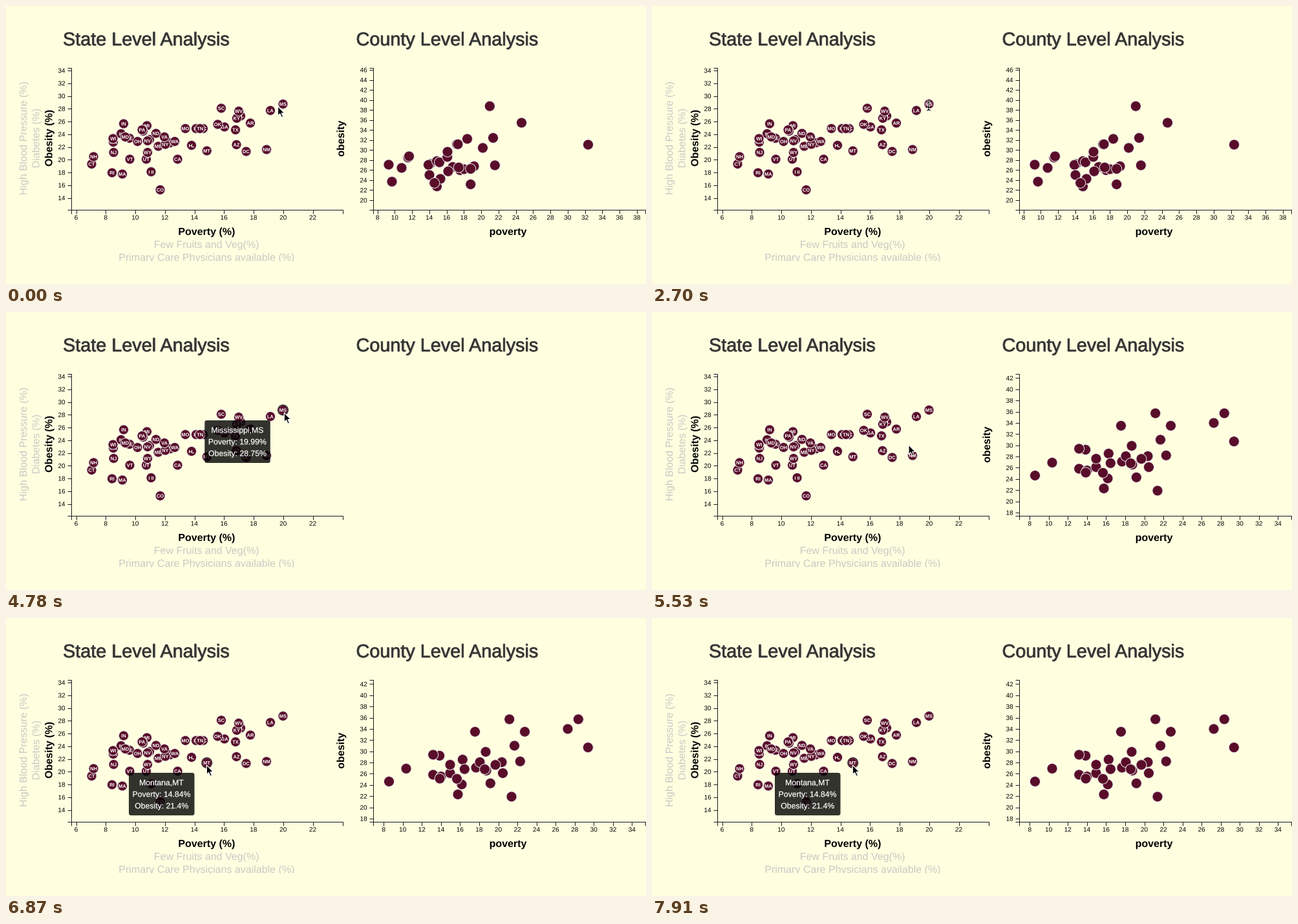
A matplotlib script for the animation above (8 s loop, 990x431 px).

```python
import matplotlib.pyplot as plt
from matplotlib.animation import FuncAnimation
from matplotlib.collections import LineCollection, PathCollection
from matplotlib.patches import Circle, FancyBboxPatch, PathPatch, Polygon, Rectangle
from matplotlib.path import Path
from matplotlib.textpath import TextPath
from matplotlib.transforms import Affine2D

W, H, DPI = 990, 431, 64
PX = 72 / DPI
STEP, LOOP = 50, 8000
MAROON, RIM, MUTED = "#590d29", "#e3e3e3", "#c9c9c5"
TOP, BOTTOM = 95.5, 315.5

fig = plt.figure(figsize=(W / DPI, H / DPI), dpi=DPI, facecolor="#ffffe0")
ax = fig.add_axes([0, 0, 1, 1])
ax.set_xlim(0, W)
ax.set_ylim(H, 0)
ax.axis("off")


def text_path(s, x, y, size, weight="normal", align="center", angle=0):
    """Outline of a string with its baseline through (x, y)."""
    path = TextPath((0, 0), s, size=size,
                    prop=dict(family="Liberation Sans", weight=weight))
    box = path.get_extents()
    shift = {"left": 0, "center": -(box.x0 + box.x1) / 2, "right": -box.x1}[align]
    place = Affine2D().translate(shift, 0).scale(1, -1).rotate_deg(angle).translate(x, y)
    return place.transform_path(path)


def add_text(s, x, y, size, color="black", stroke=0, zorder=2, **kw):
    patch = PathPatch(text_path(s, x, y, size, **kw), facecolor=color,
                      edgecolor=color if stroke else "none",
                      linewidth=stroke * PX, zorder=zorder)
    return ax.add_patch(patch)


def add_axes(left, right, xticks, yticks):
    """xticks and yticks: (first, last, pixel of first, pixels per unit)."""
    segments = [[(left - 6, TOP), (left, TOP), (left, BOTTOM), (left - 6, BOTTOM)],
                [(left, BOTTOM + 6), (left, BOTTOM), (right, BOTTOM), (right, BOTTOM + 6)]]
    artists = []
    first, last, start, scale = xticks
    for v in range(first, last + 1, 2):
        x = start + (v - first) * scale
        segments.append([(x, BOTTOM), (x, BOTTOM + 6)])
        artists.append(add_text(str(v), x, 331.3, 10))
    first, last, start, scale = yticks
    for v in range(first, last + 1, 2):
        y = start - (v - first) * scale
        segments.append([(left - 6, y), (left, y)])
        artists.append(add_text(str(v), left - 9.3, y + 3.6, 10, align="right"))
    lines = LineCollection(segments, colors="#1a1a1a", linewidths=PX, zorder=2)
    artists.append(ax.add_collection(lines))
    return artists


def add_dots(points, radius):
    dots = PathCollection([Path.circle(p, radius) for p in points], facecolors=MAROON,
                          edgecolors=RIM, linewidths=PX, zorder=3)
    return ax.add_collection(dots)


# Headings
for title, x in (("State Level Analysis", 88), ("County Level Analysis", 541.5)):
    add_text(title, x + 1, 62, 28.8, "#ebebd2", 0.7, align="left")
    add_text(title, x, 61, 28.8, "#333333", 0.7, align="left")

# State chart
add_axes(100.5, 520.5, (6, 22, 108.5, 22.875), (14, 34, 297.5, 9.875))
add_text("Poverty (%)", 310.5, 355, 16, weight="bold")
add_text("Few Fruits and Veg(%)", 310.3, 375, 16, MUTED)
cut = add_text("Primary Care Physicians available (%)", 310.5, 395, 16, MUTED)
cut.set_clip_path(Rectangle((0, 0), W, 395.5, transform=ax.transData))
add_text("Obesity (%)", 71.5, 205, 16, weight="bold", angle=-90)
add_text("Diabetes (%)", 51.5, 205, 16, MUTED, angle=-90)
add_text("High Blood Pressure (%)", 32, 205, 16, MUTED, angle=-90)

STATES = [
    ("AL", 363, 170.5), ("AZ", 356.5, 215), ("AR", 378, 181.5), ("CA", 265.5, 237.5),
    ("CO", 238.5, 285), ("CT", 132.5, 245), ("DE", 191, 205), ("DC", 371.5, 225.5),
    ("FL", 287, 216), ("GA", 338, 187.5), ("HI", 224.5, 257), ("ID", 294, 190),
    ("IL", 178, 198), ("IN", 182, 182.5), ("IA", 222, 207), ("KS", 254, 212),
    ("KY", 357, 174), ("LA", 409, 162), ("ME", 235.5, 217.5), ("MD", 184.5, 203),
    ("MA", 180, 260.5), ("MI", 218, 185.5), ("MN", 166, 211), ("MS", 428.5, 152),
    ("MO", 277.5, 190), ("MT", 310.7, 224.5), ("NE", 212, 194), ("NV", 219, 209),
    ("NH", 135.5, 233.5), ("NJ", 166.5, 227), ("NM", 403, 222.5), ("NY", 246.5, 214.5),
    ("NC", 305, 190), ("ND", 232, 197.5), ("OH", 203.5, 210), ("OK", 327.5, 183.5),
    ("PA", 210.5, 192), ("RI", 164, 258.5), ("SC", 333, 158.5), ("TN", 300, 190),
    ("TX", 355, 192), ("UT", 217, 237.5), ("VT", 191.5, 237.5), ("VA", 245, 203),
    ("WA", 261, 210), ("WV", 360, 163), ("WI", 165.5, 205.5), ("WY", 219, 227),
]
marks = []
for name, x, y in STATES:
    marks += [Path.circle((x, y), 7.5), text_path(name, x, y + 2.7, 7.5, weight="bold")]
ax.add_collection(PathCollection(marks, facecolors=[MAROON, "white"],
                                 edgecolors=[RIM, "none"], linewidths=[PX, 0], zorder=3))

# County charts
COUNTY_A = [
    (622, 235), (623.5, 233), (612, 251), (592, 246), (597, 272.3), (656, 245),
    (653.5, 246.3), (666.5, 240.5), (670.5, 242.3), (655, 262), (666.5, 279.7),
    (672, 268), (662.7, 274.3), (682.7, 234), (683, 226), (691, 249.5), (684, 256.3),
    (697.5, 214.3), (699, 214.3), (702.5, 254.5), (708.5, 253), (700.3, 250.3),
    (724, 248.5), (718.7, 252.5), (718.7, 276.5), (713.5, 206), (737.5, 220),
    (753.5, 204.5), (756.3, 247), (748.3, 155.3), (797.5, 181), (900.5, 215),
]
COUNTY_B = [
    (592.5, 253.5), (619, 233.5), (670.7, 213.5), (660.7, 212), (660.7, 243),
    (673, 245.7), (671, 249), (687, 240.5), (687, 227.5), (706.3, 219.5), (709.3, 234.3),
    (705, 258), (697.5, 249.3), (699, 273.5), (725.5, 176.3), (727, 232), (733, 223.5),
    (743, 236.5), (740.5, 234.5), (742, 207.5), (749.3, 256.3), (767, 223.5),
    (757, 227.7), (768.5, 240.5), (782, 277), (795.3, 222.3), (786.5, 198),
    (802.5, 176.3), (778.7, 157), (869, 172), (885.3, 157), (900.3, 200.7),
]
captions = [add_text("poverty", 777, 355, 16, weight="bold"),
            add_text("obesity", 523, 205.5, 16, weight="bold", angle=-90)]
chart_a = add_axes(567.5, 988.5, (8, 38, 574.7, 13.37), (20, 46, 301, 7.77))
chart_a.append(add_dots(COUNTY_A, 8))
chart_b = add_axes(567.5, 988.5, (8, 34, 584.3, 14.77), (18, 42, 311, 8.69))
chart_b.append(add_dots(COUNTY_B, 8))


def make_tip(x, y, center, lines):
    """Ring round the dot at center, plus the tooltip with its corner at (x, y)."""
    ring = Circle(center, 7.8, fill=False, edgecolor="#1c1014", linewidth=1.3 * PX, zorder=4)
    box = FancyBboxPatch((x, y), 101.5, 66, boxstyle="round,pad=0,rounding_size=3.5",
                         facecolor=(0, 0, 0, 0.8), edgecolor="none", zorder=5)
    rows = [add_text(s, x + 50.8, y + 19.3 + 18 * i, 12.25, "white", 0.2, zorder=6)
            for i, s in enumerate(lines)]
    return [ax.add_patch(ring), ax.add_patch(box)] + rows


tips = {
    "MS": make_tip(307.3, 168, (428.5, 152),
                   ["Mississippi,MS", "Poverty: 19.99%", "Obesity: 28.75%"]),
    "MT": make_tip(190, 240, (310.7, 224.5),
                   ["Montana,MT", "Poverty: 14.84%", "Obesity: 21.4%"]),
}

# Pointers, drawn round their hot spot
arrow = [ax.add_patch(Polygon(
    [(0, 0), (0, 14.6), (3.3, 11.5), (5.8, 17.3), (8.2, 16.3), (5.8, 10.6), (10.3, 10.6)],
    facecolor="black", edgecolor="white", linewidth=1.2 * PX, zorder=8))]
beam_path = Path([(-3, -7), (-1, -6.6), (0, -5), (0, 5), (-1, 6.6), (-3, 7),
                  (3, -7), (1, -6.6), (0, -5), (3, 7), (1, 6.6), (0, 5), (-2, 2), (2, 2)],
                 [1, 2, 2, 2, 2, 2, 1, 2, 2, 1, 2, 2, 1, 2])
beam = [ax.add_patch(PathPatch(beam_path, fill=False, edgecolor=c, linewidth=w * PX, zorder=8))
        for c, w in (("white", 2.8), ("black", 1.1))]

# Start in ms, pointer position, pointer kind, hovered state
MOVES = [
    (0, 420.5, 155.5, "arrow", None), (150, 425.5, 156, "arrow", None),
    (300, 423.5, 156, "arrow", None), (2700, 428, 155, "beam", None),
    (2850, 432.5, 157, "arrow", None), (2990, 434, 157, "arrow", None),
    (3290, 431, 155, "beam", None), (3440, 431.5, 156, "beam", None),
    (3890, 432, 157, "beam", None), (4030, 430.3, 156, "arrow", "MS"),
    (5380, 424, 168, "arrow", None), (5530, 397, 206, "arrow", None),
    (5680, 362, 240, "arrow", None), (5830, 336, 252, "arrow", None),
    (5980, 323, 250, "arrow", None), (6130, 319, 245, "arrow", None),
    (6270, 317, 240, "arrow", None), (6420, 316, 235, "arrow", None),
    (6570, 313, 230, "arrow", "MT"), (6720, 311, 229, "arrow", "MT"),
    (6870, 310.3, 228, "arrow", "MT"), (7160, 311, 226, "beam", None),
    (7910, 310.3, 228, "arrow", "MT"),
]
COUNTY_OFF, COUNTY_NEXT = 4780, 4930


def show(artists, visible):
    for artist in artists:
        artist.set_visible(visible)


def update(i):
    t = i * STEP + STEP - 10
    _, x, y, kind, hovered = [m for m in MOVES if m[0] <= t][-1]
    place = Affine2D().translate(x, y) + ax.transData
    for artist in arrow + beam:
        artist.set_transform(place)
    show(arrow, kind == "arrow")
    show(beam, kind == "beam")
    for name, parts in tips.items():
        show(parts, name == hovered)
    show(chart_a, t < COUNTY_OFF)
    show(chart_b, t >= COUNTY_NEXT)
    show(captions, t < COUNTY_OFF or t >= COUNTY_NEXT)
    return []


anim = FuncAnimation(fig, update, frames=LOOP // STEP, interval=STEP,
                     repeat=True, repeat_delay=0)
plt.show()
```
